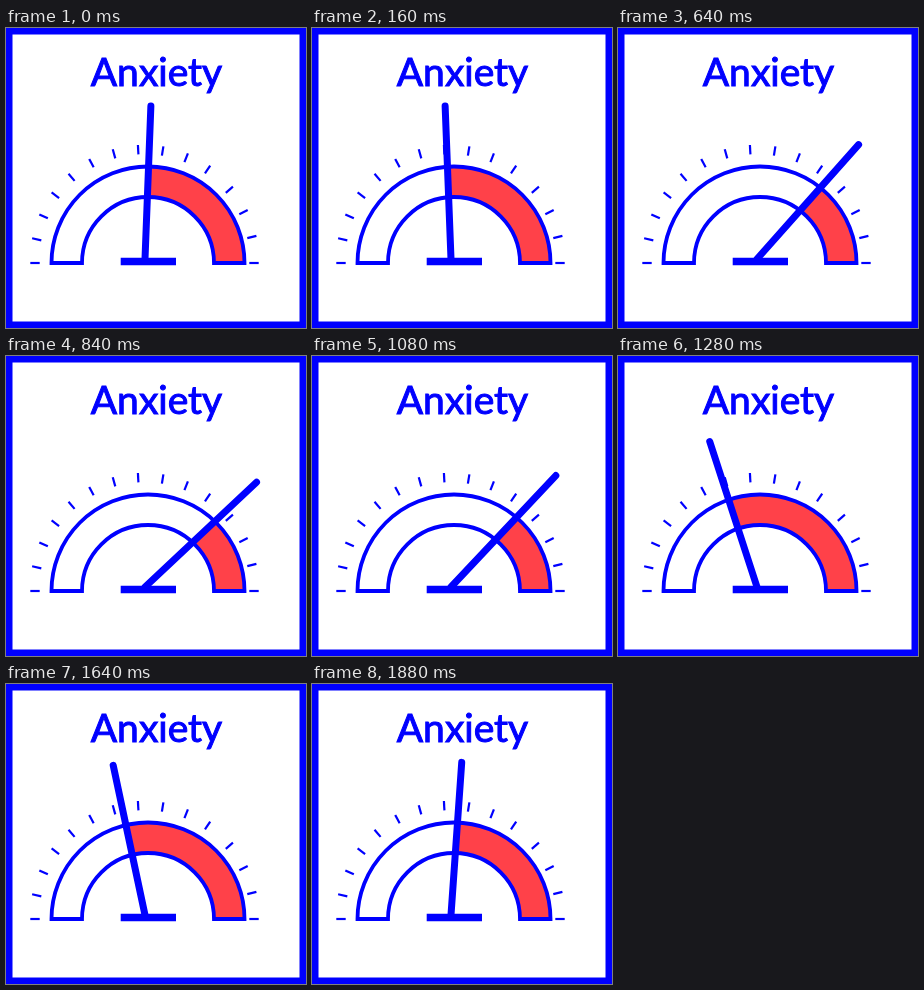
Write an HTML page with a canvas that moves like this. It is 300 px wide and 300 px high and loops after 1920 ms.

```html
<!DOCTYPE html>
<html lang="en">
<head>
<meta charset="utf-8">
<title>Anxiety</title>
<style>
  html, body { margin: 0; width: 100%; height: 100%; overflow: hidden; background: #fff; }
  canvas { display: block; width: 300px; height: 300px; }
</style>
</head>
<body>
<canvas id="stage" width="300" height="300"></canvas>
<script>
const ctx = document.getElementById('stage').getContext('2d');
const BLUE = '#0000ff', RED = '#ff4149';
const LOOP = 1920, STEP = 40, RAD = Math.PI / 180;
const HUB = { x: 139, y: 231 }, NEEDLE = 153;
const DIAL = { x: 142, y: 235, outer: 96.5, inner: 66 };

// Needle angle in degrees from vertical: slow wind-up, snap, damped swing.
const KEYS = [
  [0, 2.2], [160, -2.2], [290, -7.5], [440, 14.4], [570, 39], [840, 46.8],
  [1040, 69], [1120, 1], [1190, -55], [1280, -18], [1430, 38],
  [1640, -12], [1725, -24], [1885, 4.1]
];

function key(i) {
  const n = KEYS.length, turn = Math.floor(i / n);
  const [t, v] = KEYS[i - turn * n];
  return [t + turn * LOOP, v];
}

function slope(i) {
  const [t0, v0] = key(i - 1), [t1, v1] = key(i), [t2, v2] = key(i + 1);
  const a = (v1 - v0) / (t1 - t0), b = (v2 - v1) / (t2 - t1);
  return a * b <= 0 ? 0 : 2 * a * b / (a + b);
}

// Monotone cubic through the keys, with rest at each extreme.
function angleAt(t) {
  let i = KEYS.length - 1;
  while (KEYS[i][0] > t) i--;
  const [t0, v0] = key(i), [t1, v1] = key(i + 1);
  const d = t1 - t0, u = (t - t0) / d, w = 1 - u;
  return v0 * (1 + 2 * u) * w * w + v1 * u * u * (3 - 2 * u)
    + d * u * w * (slope(i) * w - slope(i + 1) * u);
}

function line(x0, y0, x1, y1, width, cap = 'butt') {
  ctx.lineWidth = width;
  ctx.lineCap = cap;
  ctx.beginPath();
  ctx.moveTo(x0, y0);
  ctx.lineTo(x1, y1);
  ctx.stroke();
}

function band() {
  ctx.beginPath();
  ctx.arc(DIAL.x, DIAL.y, DIAL.outer, Math.PI, 2 * Math.PI);
  ctx.arc(DIAL.x, DIAL.y, DIAL.inner, 2 * Math.PI, Math.PI, true);
  ctx.closePath();
}

// Hand-set marks: tighter on the left and top, wider on the right.
function ticks() {
  for (let i = 0; i < 15; i++) {
    const a = RAD * (i < 11 ? 12.4 * i : 180 - 13.6 * (14 - i));
    const c = -Math.cos(a), s = -Math.sin(a), r = 109.5 - 4 * s;
    const at = d => [138.5 + (r + d) * c, 235 + (r + d) * s];
    line(...at(-4.7), ...at(4.7), 2.2);
  }
}

function draw(t) {
  const a = angleAt(t) * RAD;
  ctx.fillStyle = '#fff';
  ctx.fillRect(0, 0, 300, 300);
  ctx.strokeStyle = BLUE;
  ctx.lineJoin = 'miter';
  ctx.lineWidth = 6.5;
  ctx.strokeRect(3.25, 3.25, 293.5, 293.5);

  ctx.fillStyle = BLUE;
  ctx.font = '39px Lato, "Open Sans", sans-serif';
  ctx.textAlign = 'center';
  ctx.fillText('Anxiety', 150.5, 57.5);
  ctx.lineWidth = 1;
  ctx.strokeText('Anxiety', 150.5, 57.5);

  ticks();

  ctx.save();
  band();
  ctx.clip();
  ctx.fillStyle = RED;
  ctx.beginPath();
  ctx.moveTo(HUB.x, HUB.y);
  ctx.arc(HUB.x, HUB.y, 200, a - Math.PI / 2, 0.4);
  ctx.fill();
  ctx.restore();

  band();
  ctx.lineWidth = 3.8;
  ctx.stroke();

  line(HUB.x, HUB.y, HUB.x + NEEDLE * Math.sin(a), HUB.y - NEEDLE * Math.cos(a), 7, 'round');
  line(114.7, 233.5, 170, 233.5, 7.4);
}

const start = performance.now();
function tick() {
  const t = (performance.now() - start) % LOOP;
  draw(Math.floor(t / STEP) * STEP);
  requestAnimationFrame(tick);
}
tick();
</script>
</body>
</html>
```
